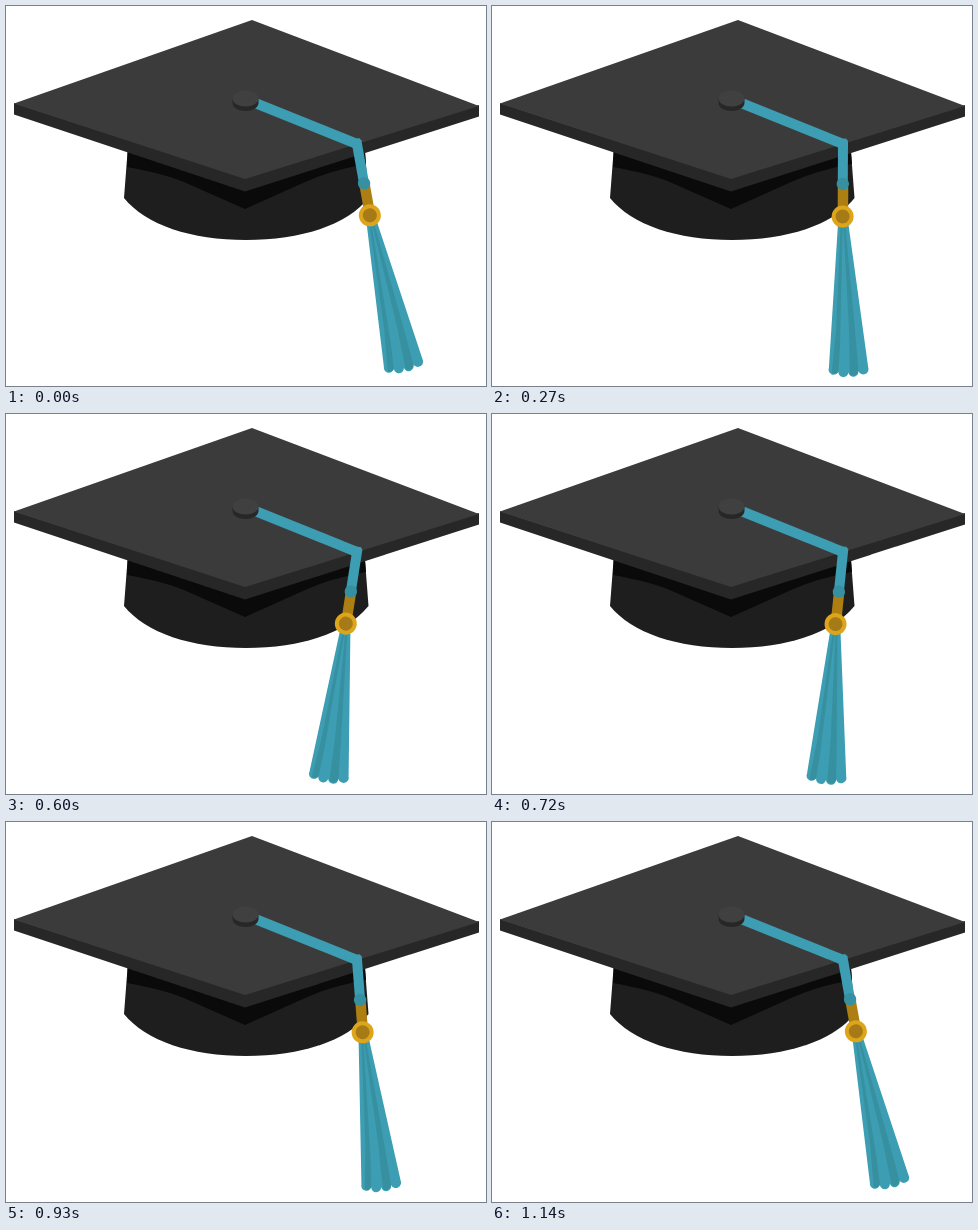
Recreate the animation shown at these times as an HTML page. Size 480 px wide and 380 px high, loop 1.2 s.

```html
<!DOCTYPE html>
<html lang="en">
<head>
<meta charset="utf-8">
<title>Graduation cap</title>
<style>
  html, body { margin: 0; width: 100%; height: 100%; overflow: hidden; background: #fff; }
  svg { display: block; width: 480px; height: 380px; }
  .teal { fill: #3d9db3; }
  .deep { fill: #36909f; }
  .cord { fill: none; stroke: #3d9db3; stroke-width: 10; }
</style>
</head>
<body>
<svg viewBox="0 0 480 380">
  <!-- cap body and the shadow under the board -->
  <path fill="#1e1e1e" d="M122 140 L118 192 C140 219 185 234 240 234 C295 234 341 219 362.500 192 L358.500 140 Z"/>
  <path fill="#0a0a0a" d="M122 140 L121 161 Q160 168 180 177 L239 203 L297 177 Q322 165 360 158 L358.500 140 Z"/>

  <!-- board -->
  <path fill="#272727" d="M8 97 L239 172 L473 99 V110.500 L239 185.500 L8 108.500 Z"/>
  <path fill="#3b3b3b" d="M8 97.500 L246 14 L473 100 L239 173 Z"/>

  <!-- cord on the board, button -->
  <path class="cord" d="M243 94.500 L351 138"/>
  <path fill="#272727" d="M226.500 92 V97 A13 8 0 0 0 252.500 97 V92 Z"/>
  <ellipse cx="239.500" cy="92.500" rx="13" ry="8" fill="#404040"/>

  <!-- tassel, drawn hanging straight down -->
  <g id="tassel">
    <path class="teal" d="M346 179 V138 L349 133 L354 132.500 L356 135 V179 Z"/>
    <path class="teal" d="M346.500 216 H356.500 L377.300 361 A5 5 0 0 1 367.500 365 A5 5 0 0 1 357.500 366.500 A5 5 0 0 1 347.500 365.500 A5 5 0 0 1 338 362 Z"/>
    <path class="deep" d="M349 222 L351 222 L349 340 L347.500 366 A5 5 0 0 1 341 367 L345 325 Z"/>
    <path class="deep" d="M352 222 L354 222 L364 325 L367.500 365 A5 5 0 0 1 359 368 L358 325 Z"/>
    <rect x="346" y="181" width="10.500" height="22" fill="#ad7f13"/>
    <circle class="deep" cx="351" cy="178" r="6.200"/>
    <circle cx="351" cy="210.500" r="11" fill="#dda51b"/>
    <circle cx="351" cy="210.500" r="7" fill="#a57a17"/>
  </g>
</svg>
<script>
  const tassel = document.getElementById('tassel');
  const LOOP = 1200, STEP = 30;
  const RIGHT = -10.2, LEFT = 9;

  const ease = p => (1 - Math.cos(Math.PI * Math.min(1, Math.max(0, p)))) / 2;

  // Swing left, rest, swing back, rest.
  function angle(t) {
    const out = ease(t / 510) - ease((t - 570) / 570);
    return RIGHT + (LEFT - RIGHT) * out;
  }

  function draw() {
    const t = Math.floor(performance.now() % LOOP / STEP) * STEP;
    tassel.setAttribute('transform', `rotate(${angle(t).toFixed(3)} 351 138)`);
    requestAnimationFrame(draw);
  }
  draw();
</script>
</body>
</html>
```
